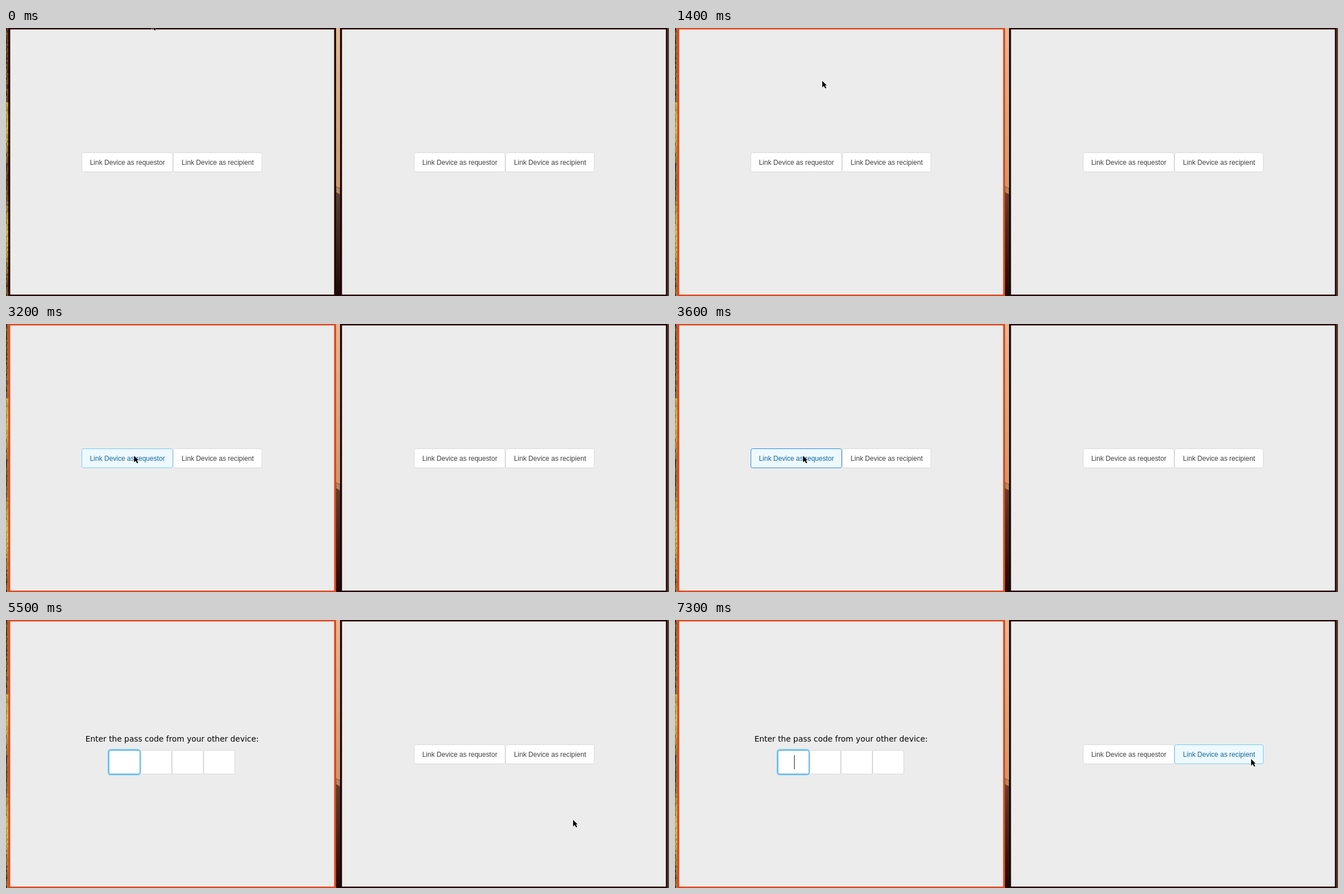
An HTML page for the animation above (8 s loop, 1175x476 px).

```html
<!DOCTYPE html>
<html lang="en">
<head>
<meta charset="utf-8">
<title>Link devices</title>
<style>
  html, body { margin: 0; width: 100%; height: 100%; overflow: hidden; background: #200306; }
  svg { display: block; width: 1175px; height: 476px; }
  .btn rect { fill: #fff; stroke: #d9d9d9; }
  .btn text { font: 12.1px "Liberation Sans", Arial, sans-serif; fill: #404040; text-anchor: middle; }
  .title { font: 13.9px "DejaVu Sans", sans-serif; text-anchor: middle; fill: #000; }
  .cell { fill: #fff; stroke: #d9d9d9; }
</style>
</head>
<body>
<svg viewBox="0 0 1175 476" xmlns="http://www.w3.org/2000/svg">
  <defs>
    <linearGradient id="sand" x1="0" y1="0" x2="0" y2="1">
      <stop offset="0" stop-color="#dfba92"/>
      <stop offset="1" stop-color="#c89a6c"/>
    </linearGradient>
    <linearGradient id="earth" x1="0" y1="0" x2="0" y2="1">
      <stop offset="0" stop-color="#5b4431"/>
      <stop offset="1" stop-color="#1c0905"/>
    </linearGradient>
  </defs>

  <rect x="585" width="7" height="284" fill="url(#sand)"/>
  <rect x="585" y="284" width="7" height="192" fill="url(#earth)"/>
  <path d="M585 282l7 3v11l-7-4z" fill="#b08c60" stroke="#4a3018" stroke-width=".6"/>
  <rect x="1172" width="3" height="476" fill="#553c2e"/>
  <g id="foliage"></g>
  <rect id="glow" x="2" width="2" height="476" fill="#f5cf60" opacity=".35"/>

  <rect id="frame" x="4" width="581" height="476"/>
  <rect x="7.5" y="2.5" width="574" height="471" fill="#ececec"/>
  <rect x="592" width="580" height="476" fill="#230306"/>
  <rect x="595.5" y="2.5" width="574" height="471" fill="#ececec"/>

  <g id="leftMenu"></g>
  <g id="rightMenu"></g>

  <g id="codeForm">
    <text class="title" x="294.3" y="216">Enter the pass code from your other device:</text>
    <g id="cells"></g>
    <rect id="ring" x="181.5" y="230.5" width="56" height="44" rx="4" fill="none" stroke="#8bd0f5" stroke-width="3"/>
    <rect x="182.5" y="231.5" width="55" height="42" rx="3" fill="#fff" stroke="#2b9be4"/>
    <rect id="caret" x="211" y="240" width="1" height="25" fill="#222"/>
  </g>

  <path id="cursor" d="M0 0L8 8H5L7 12V13H5L3 9L0 11.5z" stroke="#fff" paint-order="stroke"/>
</svg>
<script>
const LOOP = 8000, STEP = 100;
const $ = id => document.getElementById(id);

function add(parent, name, attrs, text) {
  const el = document.createElementNS("http://www.w3.org/2000/svg", name);
  for (const k in attrs) el.setAttribute(k, attrs[k]);
  if (text) el.textContent = text;
  return parent.appendChild(el);
}

function button(menu, x, w, label) {
  const g = add($(menu), "g", { class: "btn" });
  const box = add(g, "rect", { x: x + .5, y: 221.5, width: w - 1, height: 34, rx: 3 });
  const text = add(g, "text", { x: x + w / 2 + .2, y: 242.5 }, label);
  return { box, text };
}

const menu = (id, x) => [
  button(id, x, 162, "Link Device as requestor"),
  button(id, x + 162, 158, "Link Device as recipient")
];
const [askLeft] = menu("leftMenu", 134);
const [, receiveRight] = menu("rightMenu", 723);

for (let i = 3; i > 0; i--)
  add($("cells"), "rect", { class: "cell", x: 182.5 + 56 * i, y: 231.5, width: 55, height: 42, rx: 2 });

// Leafy wallpaper: bark and sunlit leaves alternate down the left edge
let seed = 11;
const rnd = () => (seed = seed * 16807 % 2147483647) / 2147483647;
for (let y = 0; y < 476; y += 4) {
  const sun = y < 130 ? 0 : .5 + .5 * Math.cos((y - 165) / 32);
  for (let x = 0; x < 4; x += 2)
    add($("foliage"), "rect", {
      x, y, width: 2, height: 4,
      fill: `hsl(${34 + 18 * sun}, 50%, ${16 + 24 * sun + 18 * rnd()}%)`
    });
}

// Pointer moves: start, end, x, y, eased out
const moves = [
  [900, 1100, 261, 94],
  [1500, 2100, 237, 143],
  [2100, 2400, 223, 199],
  [2400, 2900, 225, 229, true],
  [3000, 3200, 227, 234],
  [4400, 4700, 264, 204],
  [5000, 5500, 1005, 355],
  [5500, 5900, 1035, 272],
  [5900, 6200, 1023, 253, true],
  [6400, 6700, 1021, 247]
];

const lerp = (a, b, p) => a + (b - a) * p;
const progress = (t, from, to) => Math.max(0, Math.min(1, (t - from) / (to - from)));

function pointAt(t) {
  let at = [258, -9];
  for (const [from, to, x, y, out] of moves) {
    const p = progress(t, from, to);
    const e = out ? 1 - (1 - p) ** 3 : p;
    at = [lerp(at[0], x, e), lerp(at[1], y, e)];
  }
  return at.map(Math.round);
}

const mix = (a, b, p) => `rgb(${a.map((v, i) => Math.round(lerp(v, b[i], p)))})`;

function hover({ box, text }, p) {
  box.style.fill = mix([255, 255, 255], [238, 248, 255], p);
  box.style.stroke = mix([217, 217, 217], [114, 204, 246], p);
  text.style.fill = mix([64, 64, 64], [14, 106, 158], p);
}

const show = (el, on) => el.setAttribute("visibility", on ? "visible" : "hidden");

function draw(time) {
  const t = Math.floor(time / STEP) * STEP;
  const active = t >= 1400, form = t >= 3700;

  $("frame").setAttribute("fill", active ? "#e0461e" : "#230306");
  show($("glow"), active);
  show($("leftMenu"), !form);
  show($("codeForm"), form);

  hover(askLeft, progress(t, 2500, 2900));
  if (t === 3600) askLeft.box.style.stroke = "#2b8fd0";
  hover(receiveRight, progress(t, 5900, 6200));

  $("ring").setAttribute("opacity", t < 3800 ? .6 : 1);
  show($("caret"), form && Math.floor((t - 3700) / 600) % 2 === 0);
  $("cursor").setAttribute("transform", `translate(${pointAt(t)})`);
}

const start = performance.now();
function tick() {
  draw((performance.now() - start) % LOOP);
  requestAnimationFrame(tick);
}
tick();
</script>
</body>
</html>
```
